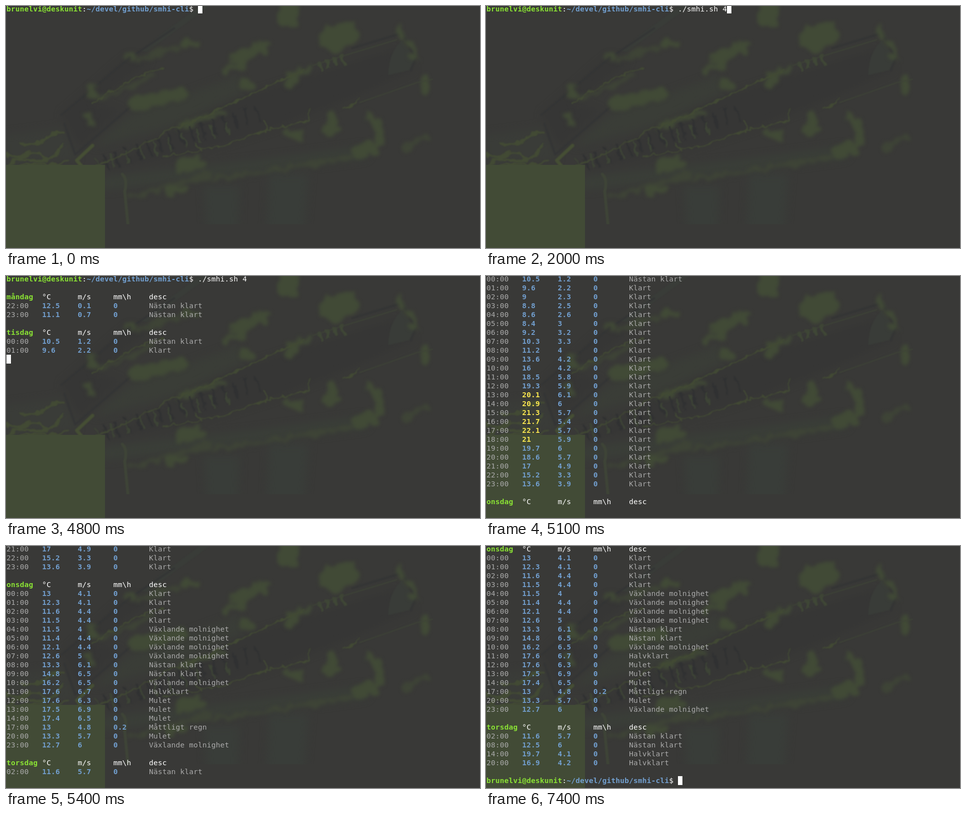
Animation, 958 px wide and 489 px high, one loop 8 s. Source, as an HTML page:

```html
<!DOCTYPE html>
<html lang="sv">
<head>
<meta charset="utf-8">
<title>Terminal forecast</title>
<style>
  html, body { margin: 0; width: 100%; height: 100%; overflow: hidden; background: #393937; }
  #stage { position: relative; width: 958px; height: 489px; overflow: hidden; }
  #stage > * { position: absolute; }
  svg { left: 0; top: 0; }
  svg g { fill: none; stroke-linecap: round; stroke-linejoin: round; }
  svg filter { color-interpolation-filters: sRGB; }
  #log {
    left: 1px; top: -3px; margin: 0; color: #fff;
    font: 14.667px/18px "DejaVu Sans Mono", monospace;
    font-variant-ligatures: none;
  }
  #log div { height: 18px; white-space: pre; }
  #log b { font-weight: 700; }
  .green { color: #8ae234; }
  .blue { color: #729fcf; }
  .yellow { color: #fce94f; }
  .dim { color: #aaa; }
  #cursor { width: 9px; height: 18px; background: #fff; }
</style>
</head>
<body>
<div id="stage">
  <svg width="958" height="489" viewBox="0 0 958 489">
    <defs>
      <filter id="haze" filterUnits="userSpaceOnUse" width="958" height="489"><feGaussianBlur stdDeviation="8"/></filter>
      <filter id="fine" filterUnits="userSpaceOnUse" width="958" height="489"><feGaussianBlur stdDeviation="1.2"/></filter>
      <filter id="leafy" filterUnits="userSpaceOnUse" width="958" height="489">
        <feTurbulence type="fractalNoise" baseFrequency=".05" numOctaves="2" seed="4"/>
        <feDisplacementMap in="SourceGraphic" scale="26" xChannelSelector="R" yChannelSelector="G"/>
        <feGaussianBlur stdDeviation="3.5"/>
      </filter>
      <filter id="ragged" filterUnits="userSpaceOnUse" width="958" height="489">
        <feTurbulence type="fractalNoise" baseFrequency=".07" numOctaves="2" seed="9"/>
        <feDisplacementMap in="SourceGraphic" scale="14" xChannelSelector="R" yChannelSelector="G"/>
        <feGaussianBlur stdDeviation="1"/>
      </filter>
    </defs>

    <!-- broad light and shade -->
    <g filter="url(#haze)">
      <path fill="#363635" d="M490 180L790 85L825 130L700 185L530 250L400 290L190 335L320 260Z"/>
      <path fill="#363635" d="M112 220L250 100L290 110L175 200L230 210L150 285Z"/>
      <path fill="#3a3d37" d="M175 285L250 220L470 140L480 175L330 245Z"/>
      <path fill="#3a3c38" d="M0 260L115 245L145 310L0 335Z"/>
      <path fill="#393d39" d="M400 365H472L468 489H408ZM532 340H612L600 489H525Z"/>
      <path stroke="#3a3e38" stroke-width="26" d="M205 358L500 325L720 296"/>
    </g>
    <g filter="url(#fine)">
      <path fill="#393c38" d="M270 90L392 0H412L285 92ZM772 140Q775 90 800 70L826 105L815 130Z"/>
      <path fill="#3b4136" d="M910 70L931 104L888 100Z"/>
      <path stroke="#343535" stroke-width="4" d="M112 220L250 105L340 45M118 238L140 300L250 205M700 85L800 55L828 105L818 130"/>
    </g>

    <!-- leaves, from large to small -->
    <g stroke="#414a36" filter="url(#leafy)">
      <path stroke-width="46" d="M572 8V24M656 66L692 56"/>
      <path stroke-width="28" d="M470 106L520 82M266 196L354 180M656 226V250M716 294L742 286M575 152L580 150M360 322L388 318M486 158L490 160"/>
      <path stroke-width="20" d="M174 168L176 184M165 224L172 238M888 6V18M570 256L592 266M848 152L845 168M735 225Q758 235 754 275"/>
      <path stroke-width="13" d="M330 375L358 368M590 136L612 124M440 132L480 118M360 78L386 74M245 102L258 100M818 72L826 104M794 44L800 64M350 244L440 214"/>
      <path stroke-width="9" stroke="#3e4436" d="M180 192L300 140M265 110L345 84M250 387L410 340M805 288L850 264M420 350L700 306"/>
    </g>

    <!-- stalks between the two branches -->
    <g filter="url(#ragged)" stroke-linecap="butt" style="stroke-linecap: butt">
      <path stroke="#303132" stroke-width="34" stroke-dasharray="4 19" d="M200 318L330 274L510 216"/>
      <path stroke="#3d4436" stroke-width="30" stroke-dasharray="4 26" d="M185 322L335 278L470 240"/>
      <path stroke="#3f4736" stroke-width="20" stroke-dasharray="7 9" d="M632 124L684 108"/>
    </g>

    <!-- twigs and grass -->
    <g stroke="#424a34" stroke-width="3" filter="url(#ragged)">
      <path d="M165 330L260 290L330 252L420 215L480 185L600 130"/>
      <path d="M176 195L250 150L320 125M320 305L440 282L530 250L612 232V208" stroke-width="2.5"/>
      <path d="M0 298q20 14 40 2t35 5t40-25M5 318q25-14 50-6t50-14M30 278q25 8 45-8t40-15M8 330q40-12 72-10t45-8" stroke-width="5"/>
      <path d="M520 232Q532 242 525 256M680 205Q700 205 715 186M384 280L394 297M888 115L870 145"/>
    </g>
    <g stroke="#3e4437" stroke-width="2" filter="url(#fine)">
      <path d="M715 195L830 155L885 143M620 120L700 95L790 68"/>
      <path d="M235 340Q246 350 240 375L251 489" stroke-width="6"/>
      <path d="M175 282L143 312L160 332" stroke="#454e34" stroke-width="7"/>
    </g>
    <rect y="321" width="200" height="200" fill="#424b36"/>
  </svg>
  <pre id="log"></pre>
  <div id="cursor"></div>
</div>
<script>
const LOOP = 8000, CELL = 9, LINE = 18, ROWS = 27;
const ENTER = 4500, PRINT = 4800, STEP = 100, BLINK = 600;
const $ = id => document.getElementById(id);

const SKY = { N: 'Nästan klart', K: 'Klart', V: 'Växlande molnighet', H: 'Halvklart', M: 'Mulet', R: 'Måttligt regn' };
const hours = (from, to, step = 1) =>
  Array.from({ length: (to - from) / step + 1 }, (_, i) => from + i * step);

// Forecast text per day: name, hours, °C, m/s, sky codes
const DAYS = [
  ['måndag', hours(22, 23), '12.5 11.1', '0.1 0.7', 'NN'],
  ['tisdag', hours(0, 23),
    '10.5 9.6 9 8.8 8.6 8.4 9.2 10.3 11.2 13.6 16 18.5 19.3 20.1 20.9 21.3 21.7 22.1 21 19.7 18.6 17 15.2 13.6',
    '1.2 2.2 2.3 2.5 2.6 3 3.2 3.3 4 4.2 4.2 5.8 5.9 6.1 6 5.7 5.4 5.7 5.9 6 5.7 4.9 3.3 3.9',
    'N' + 'K'.repeat(23)],
  ['onsdag', [...hours(0, 14), ...hours(17, 23, 3)],
    '13 12.3 11.6 11.5 11.5 11.4 12.1 12.6 13.3 14.8 16.2 17.6 17.6 17.5 17.4 13 13.3 12.7',
    '4.1 4.1 4.4 4.4 4 4.4 4.4 5 6.1 6.5 6.5 6.7 6.3 6.9 6.5 4.8 5.7 6',
    'KKKKVVVVNNVHMMMRMV'],
  ['torsdag', hours(2, 20, 6), '11.6 12.5 19.7 16.9', '5.7 6 4.1 4.2', 'NNHH']
];

const bold = (color, text) => `<b class="${color}">${text}</b>`;
const cell = text => text.padEnd(8);
const USER = 'brunelvi@deskunit', PATH = '~/devel/github/smhi-cli';
const PROMPT = bold('green', USER) + ':' + bold('blue', PATH) + '$ ';
const PROMPT_LEN = `${USER}:${PATH}$ `.length;

function dayLines([name, hrs, temps, winds, sky]) {
  const t = temps.split(' '), w = winds.split(' ');
  const head = bold('green', cell(name)) + ['°C', 'm/s', 'mm\\h', 'desc'].map(cell).join('');
  const rows = hrs.map((h, i) =>
    `<span class="dim">${cell(String(h).padStart(2, '0') + ':00')}</span>` +
    bold(t[i] >= 20 ? 'yellow' : 'blue', cell(t[i])) +
    bold('blue', cell(w[i]) + cell(sky[i] === 'R' ? '0.2' : '0')) +
    `<span class="dim">${SKY[sky[i]]}</span>`);
  return ['', head, ...rows];
}
const OUTPUT = [...DAYS.flatMap(dayLines), '', PROMPT];

// Keystrokes by time; the fifth is a tab completion
const KEYS = { 300: '.', 800: '/', 1000: 's', 1200: 'm', 1300: 'hi.sh ', 2000: '4' };
const typedAt = t => Object.keys(KEYS).filter(k => k <= t).map(k => KEYS[k]).join('');

// Eight lines a step, then seven once the screen scrolls
function printedAt(t) {
  const n = Math.max(0, Math.floor((t - PRINT) / STEP) + 1);
  return Math.min(OUTPUT.length, 8 * n - Math.max(0, n - 4));
}

function cursorOn(t) {
  if (t >= ENTER) return Math.floor((t - ENTER) / BLINK) % 2 === 0;
  return t < 1800 || (t >= 2000 && t < 3800);
}

// Fit the font's advance to the terminal grid
function snapToGrid() {
  const probe = document.createElement('span');
  probe.textContent = 'm'.repeat(100);
  $('log').append(probe);
  $('log').style.letterSpacing = CELL - probe.getBoundingClientRect().width / 100 + 'px';
  probe.remove();
}

let shown = '';
function draw(t) {
  const typed = typedAt(t), printed = printedAt(t), on = cursorOn(t);
  const entered = t >= ENTER, done = printed === OUTPUT.length;
  const key = [typed, printed, on, entered].join();
  if (key === shown) return;
  shown = key;

  const lines = [PROMPT + typed, ...OUTPUT.slice(0, printed)];
  const row = lines.length - (entered && !done ? 0 : 1);
  const col = done ? PROMPT_LEN : entered ? 0 : PROMPT_LEN + typed.length;
  const scroll = Math.max(0, row - ROWS + 1);
  $('log').innerHTML = lines.slice(scroll).map(l => `<div>${l}</div>`).join('');
  const c = $('cursor').style;
  c.left = 1 + col * CELL + 'px';
  c.top = (row - scroll) * LINE - 3 + 'px';
  c.visibility = on ? 'visible' : 'hidden';
}

snapToGrid();
const start = performance.now();
function tick() {
  draw((performance.now() - start) % LOOP);
  requestAnimationFrame(tick);
}
tick();
</script>
</body>
</html>
```
